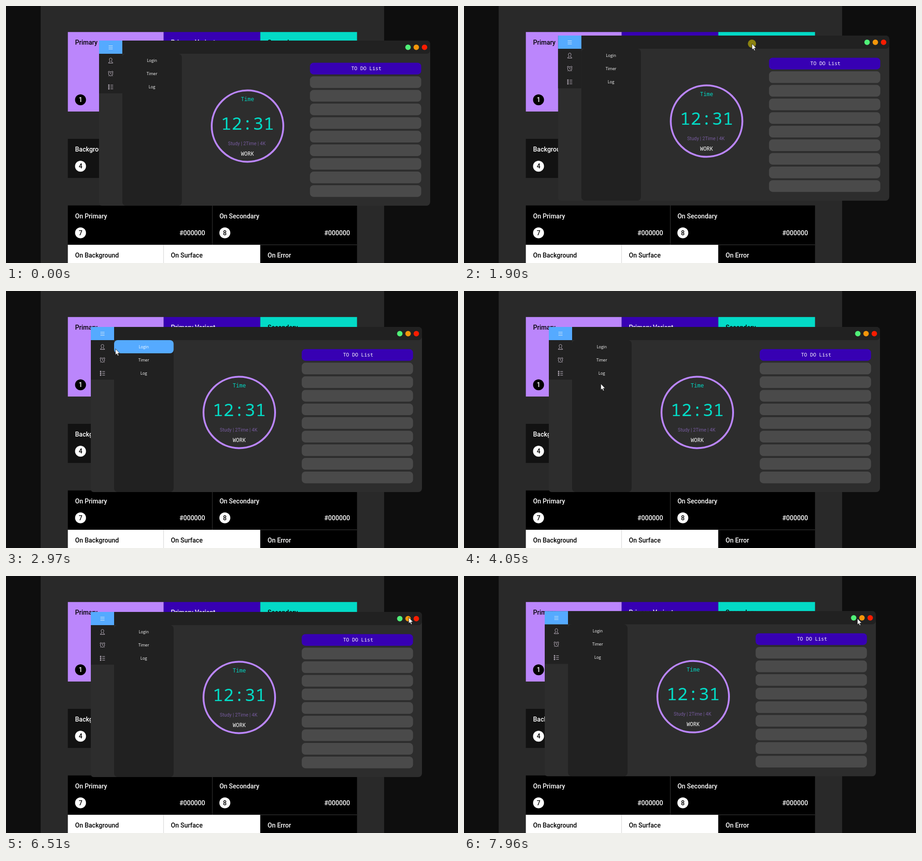
These frames come from a looping animation (991x565 px, 8000 ms). An HTML page:

```html
<!DOCTYPE html>
<html lang="en">
<head>
<meta charset="utf-8">
<title>Timer window</title>
<style>
  html, body { margin: 0; width: 100%; height: 100%; overflow: hidden; background: #0e0e0e; }
  svg { display: block; }
  .page text { font: 500 14px Roboto, sans-serif; }
  .mono { font-family: "Noto Sans Mono", monospace; }
  .mid { text-anchor: middle; }
  .label { font: 8.7px "Open Sans", sans-serif; fill: #fff; text-anchor: middle; }
  .icon { fill: none; stroke: #c9bfcd; }
</style>
</head>
<body>
<svg width="991" height="565" viewBox="0 0 991 565">
  <rect width="991" height="565" fill="#0e0e0e"/>
  <rect x="76" width="753" height="565" fill="#292929"/>
  <g class="page" id="page"></g>

  <g id="win">
    <path d="M0 0H718a8 8 0 0 1 8 8V355a8 8 0 0 1-8 8H6a6 6 0 0 1-6-6Z" fill="#2d2d2d"/>
    <path d="M51 0H718a8 8 0 0 1 8 8V21a8 8 0 0 1-8 8H51Z" fill="#212121"/>
    <rect y="29" width="51" height="87" fill="#212121"/>
    <rect x="51" y="29" width="130.5" height="334" rx="8" fill="#212121"/>
    <rect width="51" height="29" fill="#55aaff"/>
    <rect id="hover" height="29" fill="#55aaff"/>

    <g class="icon">
      <path d="M21 11.5h9M21 15h9M21 18.5h9" stroke="#d5e8f5"/>
      <path d="M25.5 38.5c-4 0-3.2 5-1.5 6.7v1.3c-2 .6-3.2 1.3-3.2 3h9.4c0-1.7-1.2-2.4-3.2-3v-1.3c1.7-1.7 2.5-6.7-1.5-6.7Z"/>
      <circle cx="25.5" cy="73" r="4.6"/>
      <path d="M25.5 70.2V73l2 1.5M20.3 70a2.2 2.2 0 0 1 2.5-2.7M30.7 70a2.2 2.2 0 0 0-2.5-2.7M22.3 76.7l-1.3 1.5M28.7 76.7l1.3 1.5"/>
      <path d="M20.5 97h2v2h-2zM20.5 101h2v2h-2zM20.5 105h2v2h-2zM25 98h6M25 102h6M25 106h6"/>
    </g>
    <g id="menu"></g>
    <g id="buttons"></g>

    <circle cx="325.5" cy="188" r="78.5" fill="none" stroke="#bb86fc" stroke-width="4"/>
    <g class="mono mid">
      <text x="325.5" y="133" font-size="12" fill="#03dac5">Time</text>
      <text x="325.5" y="196" font-size="39" fill="#03dac5">12:31</text>
      <text x="325.5" y="252.5" font-size="12" fill="#fff">WORK</text>
    </g>
    <text class="mid" x="324" y="230" font-family="Roboto, sans-serif" font-size="10.3" fill="#765b9e">Study | 2Time | 4K</text>

    <g id="list"></g>
    <text class="mono mid" x="586" y="65" font-size="11" fill="#fff">TO DO List</text>
  </g>

  <g id="cursor">
    <circle id="click" r="9" fill="#fae800" fill-opacity=".49"/>
    <path d="M0 0V13.5l3-2.7 2.1 4.7 2.2-1-2.1-4.5h4.3Z" fill="#fff" stroke="#111" stroke-width=".8"/>
  </g>
</svg>
<script>
const $ = id => document.getElementById(id);
const ROW = 29, SIDE = 51, DRAWER = 130.5;

// Palette page: rows of numbered colour tiles
let count = 0;
const row = (y, h, edges, tiles) => tiles.map(([name, fill, ink], i) => {
  const x = edges[i], w = edges[i + 1] - x, cx = x + 27.8, cy = y + h - 25.7;
  return `<rect x="${x}" y="${y}" width="${w}" height="${h}" fill="${fill}"/>
    <text x="${x + 15.9}" y="${y + 28}" fill="${ink}">${name}</text>
    <circle cx="${cx}" cy="${cy}" r="12" fill="${ink}"/>
    <text class="mid" x="${cx}" y="${cy + 5}" fill="${ink === '#fff' ? '#000' : '#fff'}">${++count}</text>
    <text x="${x + w - 15.5}" y="${cy + 5}" text-anchor="end" fill="${ink}">${fill.toUpperCase()}</text>`;
}).join('');

const thirds = [135.6, 345.7, 557.6, 769.6];
const halves = [135.6, 452, 769.6];
const DARK = '#121212', BLACK = '#000000', WHITE = '#ffffff';
$('page').innerHTML =
  row(57.2, 174.8, thirds, [['Primary', '#bb86fc', '#000'], ['Primary Variant', '#3700b3', '#fff'], ['Secondary', '#03dac6', '#000']]) +
  row(292, 86, thirds, [['Background', DARK, '#fff'], ['Surface', DARK, '#fff'], ['Error', '#cf6679', '#000']]) +
  row(438.5, 86, halves, [['On Primary', BLACK, '#fff'], ['On Secondary', BLACK, '#fff']]) +
  row(525, 86, thirds, [['On Background', WHITE, '#000'], ['On Surface', WHITE, '#000'], ['On Error', BLACK, '#fff']]) +
  '<path d="M452.500 438V525M557.600 525H769.600" stroke="#292929" stroke-width="1.500"/>';

$('menu').innerHTML = ['Login', 'Timer', 'Log'].map((name, i) =>
  `<text class="label" x="116" y="${47 + i * ROW}">${name}</text>`).join('');

$('buttons').innerHTML = ['#50f078', '#f5960a', '#fa1c00'].map((fill, i) =>
  `<circle cx="${677.4 + i * 18.1}" cy="14.7" r="6" fill="${fill}"/>`).join('');

$('list').innerHTML = Array.from({ length: 10 }, (_, i) =>
  `<rect x="462.4" y="${48.7 + i * 29.92}" width="244" height="25.7" rx="8" fill="${i ? '#4a4a4a' : '#3700b3'}"/>`).join('');

// A phase with a grab point drags the window, the others move the pointer.
const STEP = 76.73, START = 210, LOOP = 8000, GRAB_Y = 17.8;
const phases = [
  { path: [[0, 905, 530], [6, 514, 71], [10, 629, 94]] },
  { grab: 425, path: [[11, 204, 76], [13, 229, 66], [17, 108.2, 85.5], [19, 35, 50], [20, 85, 25],
    [23, 267, 85], [25, 245, 153], [27, 172.7, 121.2], [30, 186, 79]] },
  { path: [[30, 611, 97], [36, 240, 127], [39, 205, 124], [43, 292, 122], [50, 300, 204],
    [58, 301, 120], [65, 299, 158], [76, 850, 95], [82, 883, 91], [84, 850, 95]] },
  { grab: 629.5, path: [[85, 186, 79], [88, 195, 22], [91, 160.6, 26.8], [94, 202, 97],
    [96, 224, 92], [98, 177, 77.3]] },
  { path: [[99, 806.5, 95], [101, 862.5, 93.5]] }
];
const drags = phases.filter(p => p.grab);
const timer = $('menu').children[1];

const smooth = u => u * u * (3 - 2 * u);
const current = (list, k) => list.filter(p => p.path[0][0] <= k).pop() || list[0];

function at({ path, grab }, k) {
  const next = path.findIndex(p => p[0] > k);
  const b = path[next < 0 ? path.length - 1 : next];
  const a = path[next > 0 ? next - 1 : next] || b;
  const u = a === b ? 0 : (k - a[0]) / (b[0] - a[0]);
  const e = grab ? u : smooth(u);
  return [a[1] + (b[1] - a[1]) * e, a[2] + (b[2] - a[2]) * e];
}

const move = (el, x, y) => el.setAttribute('transform', `translate(${x} ${y})`);
const show = (el, on) => { el.style.display = on ? '' : 'none'; };

function setHover(x, y) {
  const i = Math.floor(y / ROW) - 1, label = x >= SIDE, hover = $('hover');
  show(hover, i >= 0 && i < 3 && x >= 0 && x < SIDE + DRAWER);
  hover.setAttribute('x', label ? SIDE : 0);
  hover.setAttribute('y', ROW * (i + 1));
  hover.setAttribute('width', label ? DRAWER : SIDE);
  hover.setAttribute('rx', label ? 8 : 0);
}

function draw() {
  const t = performance.now() % LOOP;
  const k = Math.floor((t - START) / STEP + 0.1);
  const phase = current(phases, k), { grab } = phase;
  const [wx, wy] = at(current(drags, k), k);
  const [x, y] = grab ? [wx + grab, wy + GRAB_Y] : at(phase, k);
  const press = k === 64 || k === 65;

  move($('win'), wx, wy);
  move($('cursor'), x, y);
  show($('cursor'), k >= 0);
  show($('click'), grab || press);
  move(timer, +press, +press);
  setHover(x - wx, y - wy);
  requestAnimationFrame(draw);
}
draw();
</script>
</body>
</html>
```
